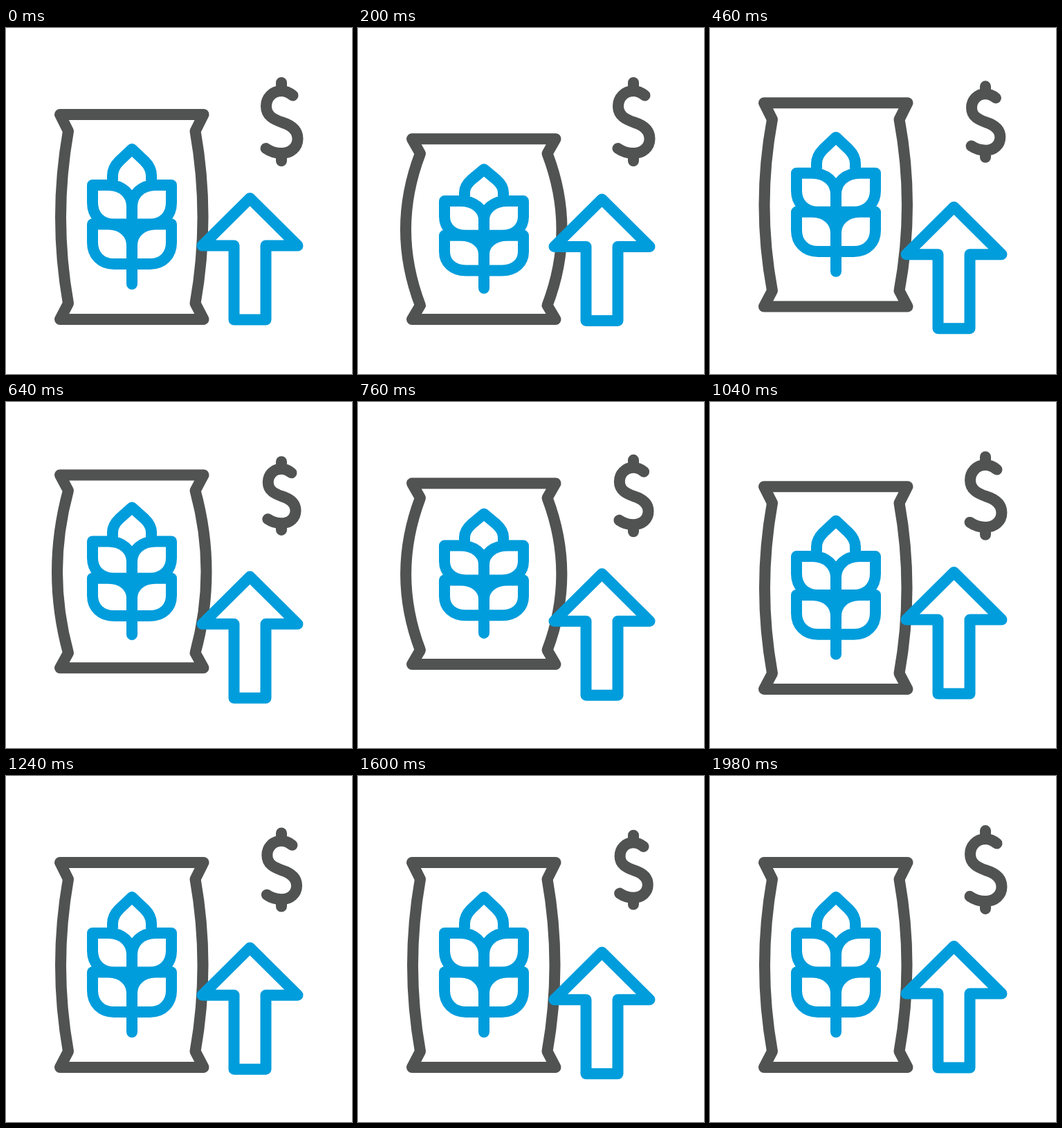
Write an HTML page that moves like this. It is 500 by 500 pixels and loops after 2 s.

```html
<!DOCTYPE html>
<html lang="en">
<head>
<meta charset="utf-8">
<title>Grain price rise</title>
<style>
  html, body { margin: 0; width: 100%; height: 100%; overflow: hidden; background: #fff; }
  svg { display: block; width: 100vw; height: 100vh; }
  path {
    fill: none; stroke-width: 16; stroke-linecap: round; stroke-linejoin: round;
    vector-effect: non-scaling-stroke;
  }
  .gray { stroke: #505351; }
  .blue { stroke: #009ddc; }
</style>
</head>
<body>
<svg viewBox="0 0 500 500">
  <path id="bag" class="gray"/>
  <path id="wheat" class="blue"/>
  <path id="arrow" class="blue" d="M352.5 246L421.500 314.500H375.500V421.500H329.500V314.500H283.500Z"/>
  <path id="dollar" class="gray" d="M398 79V91M398 181V192M414.500 97.500C409 93 404 91 398 91C385 91 376 101 376 113C376 127 387 132 398 136C411 140 421.500 147 421.500 160C421.500 172 412 181 398 181C389 181 382 178.500 375.500 174"/>
</svg>
<script>
const LOOP = 2000, STEP = 20, FLOOR = 421;
const [bag, wheat, arrow, dollar] =
  ['bag', 'wheat', 'arrow', 'dollar'].map(id => document.getElementById(id));

// Keys are [time, value] pairs, eased smoothly between neighbours.
const SQUASH = [[0, 0], [200, 1], [500, 0], [785, 1], [1100, 0], [LOOP, 0]];
const BULGE = [[0, 68], [200, 48], [500, 68], [780, 48], [1030, 68], [LOOP, 68]];
const LIFT = [[0, 0], [200, 0], [765, 42], [850, 42], [1100, 0], [LOOP, 0]];
const SCALE = [[0, 1], [200, 1], [600, .87], [1000, 1], [1500, .87], [LOOP, 1]];

function track(keys, t) {
  const i = keys.findIndex(([time]) => time > t);
  const [t0, a] = keys[i - 1], [t1, b] = keys[i];
  const x = (t - t0) / (t1 - t0);
  return a + (b - a) * x * x * (3 - 2 * x);
}

// Cubic bezier (.2, .1, .2, 1), solved for x by bisection.
function ease(x) {
  let lo = 0, hi = 1;
  for (let i = 0; i < 20; i++) {
    const s = (lo + hi) / 2;
    if (.6 * s * (1 - s) + s ** 3 < x) lo = s; else hi = s;
  }
  const r = 1 - lo;
  return .3 * lo * r * r + 3 * lo * lo * r + lo ** 3;
}

// Heights shrink towards the floor while the stroke keeps its weight.
function drawBag(squash, bulge, lift) {
  const k = 1 - .119 * squash;
  const y = v => FLOOR - lift - (FLOOR - v) * k;
  const p = (x, v) => `${x} ${y(v)} `;

  bag.setAttribute('d',
    `M${p(78, 125)}L${p(285.5, 125)}L${p(273.5, 149)}Q${p(363.5 - bulge, 273.5)}${p(273.5, 398)}` +
    `L${p(285.5, 421)}L${p(78, 421)}L${p(90, 398)}Q${p(bulge, 273.5)}${p(90, 149)}Z`);

  const side = flip => {
    const q = (x, v) => p(flip ? 364 - x : x, v);
    const leaf = (top, bottom) =>
      `M${q(125, top)}L${q(148, top)}C${q(168, top)}${q(182, top + 13)}${q(182, top + 31)}` +
      `L${q(182, bottom)}L${q(156, bottom)}` +
      `C${q(137, bottom)}${q(125, bottom - 13)}${q(125, bottom - 31)}Z`;
    return leaf(227, 283.5) + leaf(283.5, 341) +
      `M${q(154, 219)}L${q(154, 213)}C${q(154, 203)}${q(160, 196)}${q(164, 192)}L${q(182, 175)}`;
  };
  wheat.setAttribute('d', side(false) + side(true) + `M${p(182, 283)}L${p(182, 370)}`);
}

function draw(now) {
  const t = Math.floor(now % LOOP / STEP) * STEP;
  drawBag(track(SQUASH, t), track(BULGE, t), track(LIFT, t));

  const away = Math.abs(t % 1000 - 500) / 500;
  arrow.setAttribute('transform', `translate(0 ${14 * (1 - ease(away))})`);

  const s = track(SCALE, t);
  dollar.setAttribute('transform', `translate(398 136) scale(${s}) translate(-398 -136)`);
}

const start = performance.now();
function tick() {
  draw(performance.now() - start);
  requestAnimationFrame(tick);
}
tick();
</script>
</body>
</html>
```
